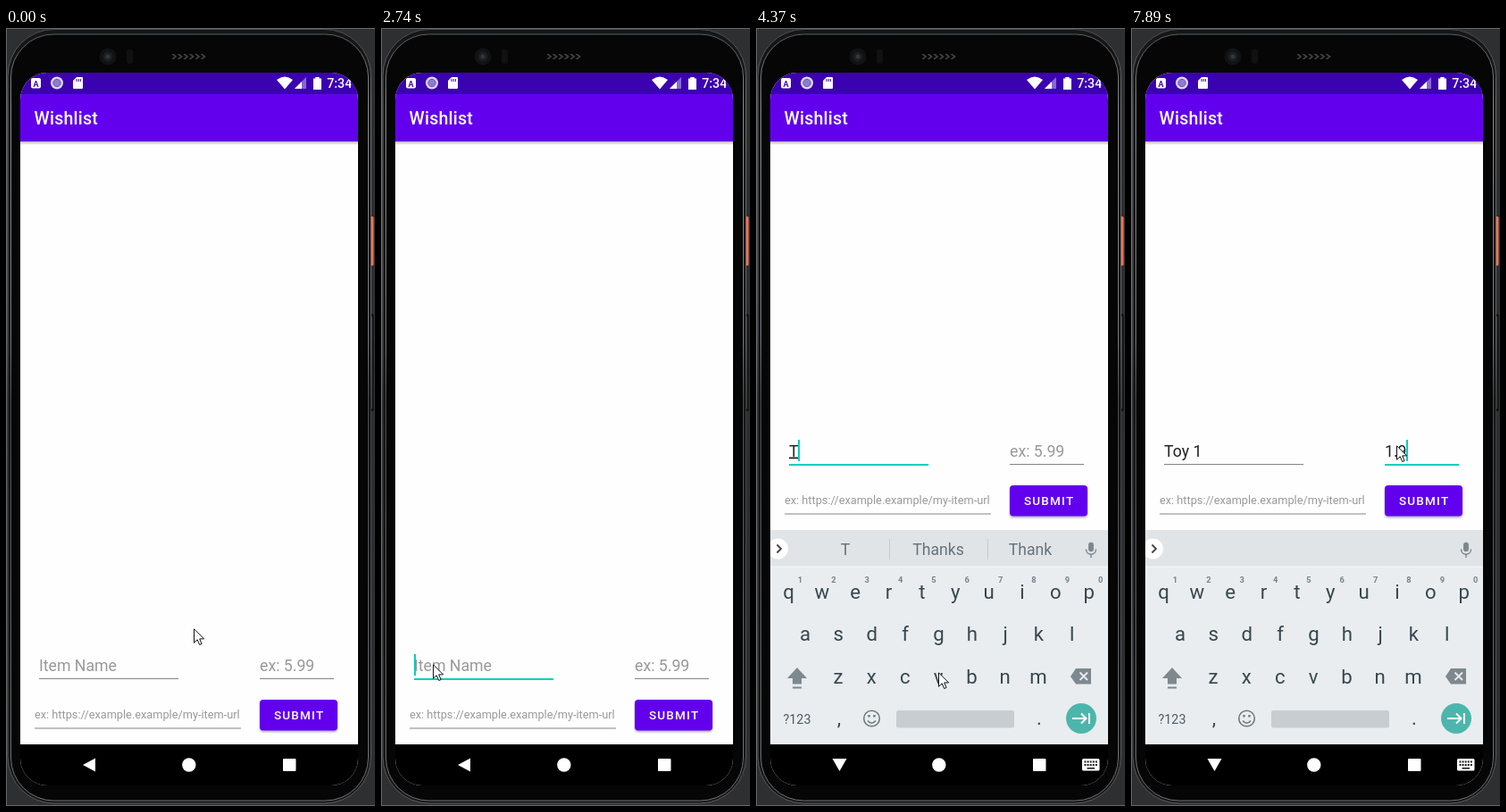
An HTML page that plays this animation: 413x871 px, repeating every 8 s.

```html
<!DOCTYPE html>
<html lang="en">
<head>
<meta charset="utf-8">
<title>Wishlist</title>
<style>
  html, body { margin: 0; width: 100%; height: 100%; overflow: hidden; background: #2d2f31; }
  svg { display: block; width: 100%; height: 100%; }
  text { font-family: Roboto, "Noto Sans", sans-serif; white-space: pre; }
  .mid { text-anchor: middle; }
  .field { font-size: 17.7px; fill: #1f1f1f; }
  .hint { fill: #999; }
  .key { font-size: 22.2px; fill: #37474f; }
  .digit { font-size: 9.3px; font-weight: 700; fill: #78838a; }
  .word { font-size: 17.6px; fill: #66727a; }
  .line { fill: #858585; }
  .line.on { fill: #03d0bf; }
</style>
</head>
<body>
<svg viewBox="0 0 413 871">
  <defs>
    <clipPath id="screen"><rect x="16" y="50" width="378" height="798" rx="30"/></clipPath>
    <linearGradient id="rim" x1="0" y1="0" x2="0" y2="1">
      <stop offset="0" stop-color="#5c5d5e"/><stop offset=".1" stop-color="#8a8b8c"/>
      <stop offset=".4" stop-color="#77787a"/><stop offset=".48" stop-color="#4a4b4c"/>
      <stop offset="1" stop-color="#727374"/>
    </linearGradient>
    <linearGradient id="shade" x1="0" y1="0" x2="0" y2="1">
      <stop offset="0" stop-color="#000" stop-opacity=".28"/><stop offset="1" stop-color="#000" stop-opacity="0"/>
    </linearGradient>
    <filter id="lift" x="-10%" y="-20%" width="120%" height="150%">
      <feDropShadow dx="0" dy="1.5" stdDeviation="1.2" flood-opacity=".35"/>
    </filter>
    <pattern id="mesh" x="185" y="29" width="6.5" height="6" patternUnits="userSpaceOnUse">
      <path d="M1 0L5 3L1 6" fill="none" stroke="#4b4b4b" stroke-width="1.5"/>
    </pattern>
  </defs>

  <!-- Phone body -->
  <path d="M0 .5H413M0 870.5H413M.5 0V871" stroke="#66686a"/>
  <rect x="407" y="320" width="4.5" height="109" rx="1.5" fill="#111"/>
  <path d="M409.5 323V426" stroke="#3c3d3e"/>
  <rect x="407" y="211" width="4.5" height="55" rx="1.5" fill="#f0714f"/>
  <rect x="2" y="1.5" width="406.5" height="866.5" rx="52" fill="#151617" stroke="url(#rim)" stroke-opacity=".7"/>
  <rect x="5.5" y="7" width="400" height="858" rx="48" fill="#060606" stroke="url(#rim)"/>
  <circle cx="114" cy="32" r="9.5" fill="#111214"/>
  <circle cx="114" cy="32" r="5.5" fill="#1c1e20"/>
  <circle cx="114" cy="32" r="2.5" fill="#33363a"/>
  <rect x="135" y="24" width="7" height="16" rx="2" fill="#111"/>
  <rect x="185" y="29" width="39" height="6" rx="2" fill="url(#mesh)"/>

  <g clip-path="url(#screen)">
    <rect x="16" y="50" width="378" height="798" fill="#fefefe"/>
    <rect x="16" y="127" width="378" height="4" fill="url(#shade)"/>
    <rect x="16" y="73" width="378" height="54" fill="#6200ee"/>
    <rect x="16" y="50" width="378" height="24" fill="#3b02b2"/>
    <text x="31.5" y="107.8" font-size="19.5" font-weight="500" letter-spacing=".25" fill="#fff">Wishlist</text>

    <!-- Status bar -->
    <g fill="#fff">
      <rect x="28" y="56" width="11" height="11.5" rx="2"/>
      <text class="mid" x="33.5" y="65.5" font-size="9" font-weight="700" style="fill:#3b02b2">A</text>
      <circle cx="57" cy="61.5" r="7" fill="#dcd6f0"/>
      <circle cx="57" cy="61.5" r="4.2" fill="#8d7dcb" stroke="#6a4fc0"/>
      <path d="M79 55H85Q86 55 86 56V67Q86 68 85 68H76Q75 68 75 67V59Z"/>
      <path d="M79 57V60M81.2 57V60M83.4 57V60" stroke="#3b02b2"/>
      <path d="M303 58Q312 51 321 58L312 68.5Z"/>
      <path d="M323 68H336V55Z" fill-opacity=".4"/>
      <path d="M323 68H331V60Z"/>
      <path d="M344 56.5H346.3V55H350.7V56.5H353V69H344Z"/>
      <text x="359.3" y="66.8" font-size="14.2" font-weight="500">7:34</text>
    </g>
    <rect x="386.3" y="52" width="8" height="20" fill="#3b02b2"/>

    <g id="form">
      <text id="nameHint" class="field hint" x="37" y="719.5">Item Name</text>
      <text id="name" class="field" x="37" y="719.5"></text>
      <rect id="nameLine" class="line" x="37" y="728" width="156"/>
      <text id="priceHint" class="field hint" x="284" y="719.5">ex: 5.99</text>
      <text id="price" class="field" x="284" y="719.5"></text>
      <rect id="priceLine" class="line" x="284" y="728" width="83"/>
      <rect id="caret" y="701" width="2" height="24" fill="#03d0bf"/>
      <text class="hint" x="32" y="773.3" font-size="12.75">ex: https://example.example/my-item-url</text>
      <rect class="line" x="32" y="783.5" width="231" height="1"/>
      <rect x="284" y="752" width="87" height="34.5" rx="4" fill="#6200ee" filter="url(#lift)"/>
      <text x="300" y="774.3" font-size="13.5" font-weight="500" letter-spacing="1.2" fill="#fff">SUBMIT</text>
    </g>

    <rect x="16" y="802" width="378" height="46"/>

    <g id="board">
      <rect x="16" y="562" width="378" height="240" fill="#e9edef"/>
      <rect x="16" y="562" width="378" height="41" fill="#e0e4e7"/>
      <rect x="16" y="602.5" width="378" height="1.5" fill="#f1f3f4"/>
      <circle cx="24.5" cy="583" r="11.5" fill="#fff"/>
      <path d="M23.5 578.5L28 583L23.5 587.5" fill="none" stroke="#444" stroke-width="1.8"/>
      <path id="bars" d="M149.5 572V595M259.5 572V595" stroke="#c6cbcf"/>
      <text class="word mid" x="100" y="590"></text>
      <text class="word mid" x="204" y="590"></text>
      <text class="word mid" x="307" y="590"></text>
      <g fill="none" stroke="#7d888e" stroke-width="1.5">
        <rect x="372.8" y="576.5" width="4.4" height="9" rx="2.2" fill="#7d888e"/>
        <path d="M369.5 583.5C369.5 591 380.5 591 380.5 583.5M375 589V593"/>
      </g>
      <g id="keys"></g>
      <g fill="#7d898f">
        <path d="M46 716L57 728H51V734.5H41V728H35Z"/>
        <rect x="41" y="737.5" width="10" height="2"/>
        <path d="M352 726L358 717H375V734.5H358Z"/>
      </g>
      <path d="M362.5 721.5L371 730M371 721.5L362.5 730" stroke="#e9edef" stroke-width="1.8"/>
      <text class="mid" x="46" y="778.5" font-size="14.3" fill="#4d5b62">?123</text>
      <g fill="none" stroke="#6f7b81" stroke-width="1.6">
        <circle cx="129.5" cy="773" r="8.8"/>
        <path d="M125 775.5Q129.5 781 134 775.5"/>
      </g>
      <path d="M126.5 769V771.5M132.5 769V771.5" stroke="#6f7b81" stroke-width="2.4"/>
      <rect x="157" y="764" width="132" height="19.5" rx="2.5" fill="#c8cdd1"/>
      <circle cx="364" cy="773" r="17" fill="#4db6ac"/>
      <path d="M354 773H369M364 767.5L369.5 773L364 778.5M373 767V779" fill="none" stroke="#fff" stroke-width="2"/>
    </g>

    <!-- Navigation icons -->
    <g fill="#fff">
      <path id="back" d="M86 825L100 817.5V832.5Z"/>
      <path id="down" d="M85.5 818H101.5L93.5 832Z"/>
      <circle cx="204.8" cy="825" r="7.7"/>
      <rect x="310" y="818" width="14.5" height="14" rx="1"/>
      <g id="toggle">
        <rect x="365" y="818" width="19.5" height="13.5" rx="1.5"/>
        <path d="M367.5 821.5H382M367.5 825H382" stroke="#111" stroke-width="1.8" stroke-dasharray="1.9 1.2"/>
        <path d="M370.5 828.7H379" stroke="#111" stroke-width="1.6"/>
      </g>
    </g>
  </g>

  <path id="mouse" d="M.5 .8V16.3L4.2 12.8L6.7 18.5L9.1 17.5L6.7 11.9H11.6Z" fill="#fff" stroke="#111"/>
</svg>

<script>
const $ = id => document.getElementById(id);
const LOOP = 8000;

function addKey(char, x, y, kind = "key") {
  const el = document.createElementNS("http://www.w3.org/2000/svg", "text");
  el.setAttribute("class", kind + " mid");
  el.setAttribute("x", x);
  el.setAttribute("y", y);
  el.textContent = char;
  $("keys").append(el);
}
const addRow = (chars, x, y, kind) =>
  [...chars].forEach((c, i) => addKey(c, x + i * 37.35, y, kind));
addRow("qwertyuiop", 36.5, 638.5);
addRow("1234567890", 49.5, 620.5, "digit");
addRow("asdfghjkl", 55, 686);
addRow("zxcvbnm", 92, 734);
addKey(",", 93, 780);
addKey(".", 317, 780);

const starters = ["I'm", "I", "we"];
const none = ["", "", ""];

// Each step changes only the listed parts of the state.
const steps = [
  [0, { mouse: [210, 672], focus: "", caret: false, open: false, drop: 0, fade: 0,
        name: "", price: "", draft: false, words: starters }],
  [520, { mouse: [173, 740] }],
  [640, { mouse: [226, 793] }],
  [1010, { mouse: [205, 765] }],
  [1130, { mouse: [160, 730] }],
  [1250, { mouse: [115, 702] }],
  [1370, { mouse: [87, 692] }],
  [1520, { mouse: [88, 704] }],
  [1670, { mouse: [89, 708] }],
  [2250, { mouse: [76, 709] }],
  [2370, { mouse: [63, 711] }],
  [2490, { mouse: [58, 712] }],
  [2740, { focus: "name", caret: true }],
  [2860, { drop: 77, fade: .45 }],
  [2980, { open: true, drop: 0, fade: .9 }],
  [3100, { mouse: [80, 714], fade: 1 }],
  [3220, { mouse: [130, 718], caret: false }],
  [3340, { mouse: [180, 720] }],
  [3460, { mouse: [204, 721] }],
  [3710, { caret: true }],
  [4370, { name: "T", draft: true, words: ["T", "Thanks", "Thank"] }],
  [4740, { name: "To", words: ["To", "Too", "Today"] }],
  [5000, { name: "Toy", words: ["Toys", "Toy", "Tow"] }],
  [5250, { name: "Toy ", draft: false, words: ["is", "and", "to"] }],
  [5650, { name: "Toy 1" }],
  [5770, { words: none }],
  [6300, { mouse: [215, 690] }],
  [6420, { mouse: [245, 610] }],
  [6540, { mouse: [275, 530] }],
  [6660, { mouse: [292, 485] }],
  [6780, { mouse: [297, 467] }],
  [6900, { focus: "price" }],
  [7400, { price: "1" }],
  [7520, { price: "1.", words: starters }],
  [7890, { price: "1.9", words: none }]
];

const stateAt = time =>
  Object.assign({}, ...steps.filter(([at]) => at <= time).map(([, part]) => part));
const show = (id, on) => $(id).setAttribute("visibility", on ? "visible" : "hidden");

function drawField(id, state) {
  const on = state.focus === id;
  $(id).textContent = state[id];
  show(id + "Hint", !state[id]);
  $(id + "Line").setAttribute("class", on ? "line on" : "line");
  $(id + "Line").setAttribute("height", on ? 2 : 1);
  if (on) {
    const left = +$(id).getAttribute("x");
    const width = state[id] ? $(id).getComputedTextLength() : 0;
    $("caret").setAttribute("x", Math.max(left, Math.round(left + width - 0.9)));
  }
}

function draw(state) {
  drawField("name", state);
  drawField("price", state);
  $("name").setAttribute("text-decoration", state.draft ? "underline" : "none");
  show("caret", state.caret);
  $("form").setAttribute("transform", `translate(0 ${state.open ? -240 : 0})`);
  $("board").setAttribute("transform", `translate(0 ${state.drop})`);
  $("board").setAttribute("opacity", state.fade);
  document.querySelectorAll(".word").forEach((el, i) => el.textContent = state.words[i]);
  show("bars", state.words[0]);
  show("back", !state.fade);
  show("down", state.fade);
  show("toggle", state.fade);
  $("mouse").setAttribute("transform", `translate(${state.mouse})`);
}

const start = performance.now();
function tick() {
  draw(stateAt((performance.now() - start) % LOOP));
  requestAnimationFrame(tick);
}
tick();
</script>
</body>
</html>
```
